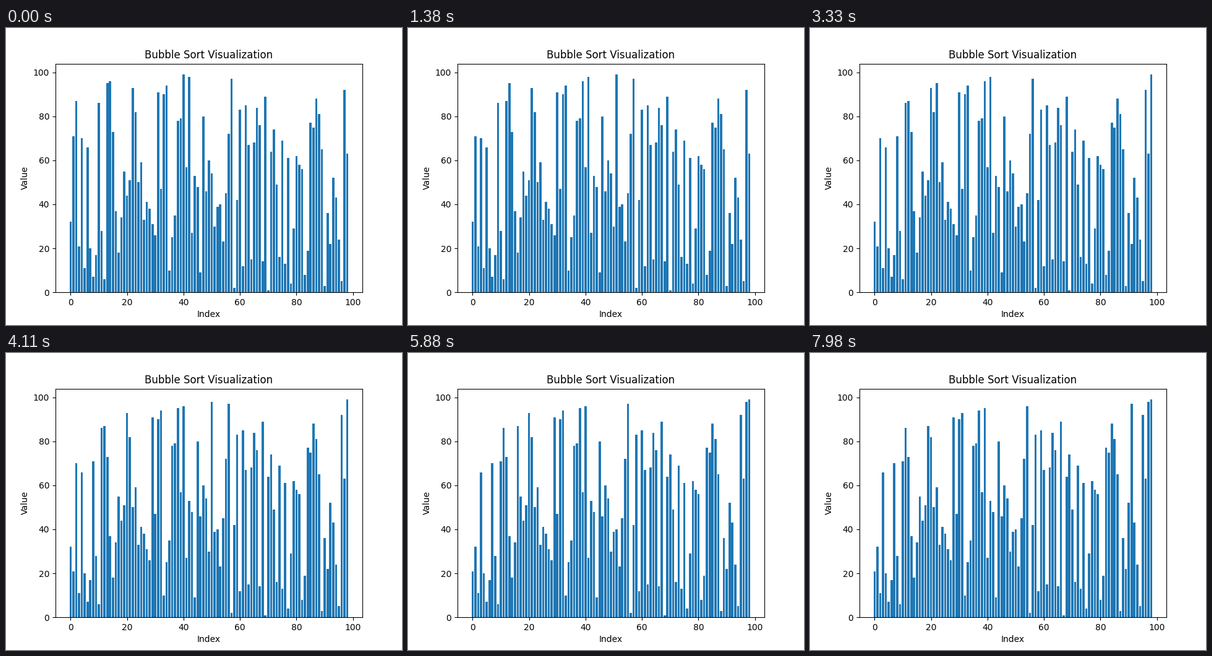
Write a matplotlib script that moves like this. It is 640x480 px and loops after 8000 ms.

```python
import matplotlib.pyplot as plt
from matplotlib.animation import FuncAnimation

LOOP_MS = 8000
INTERVAL = 20
SWAP_MS = 30

START = [
    32, 71, 87, 21, 70, 11, 66, 20, 7, 17,
    86, 28, 6, 95, 96, 73, 37, 18, 34, 55,
    44, 51, 93, 82, 50, 59, 33, 41, 38, 31,
    26, 91, 47, 90, 94, 10, 25, 35, 78, 79,
    99, 57, 98, 27, 53, 48, 9, 80, 46, 60,
    54, 30, 39, 40, 23, 45, 72, 97, 2, 42,
    83, 12, 85, 67, 15, 68, 84, 76, 14, 89,
    1, 64, 74, 49, 16, 69, 13, 61, 4, 29,
    62, 58, 56, 8, 19, 77, 75, 88, 81, 65,
    3, 36, 22, 52, 43, 24, 5, 92, 63,
]


def bubble_states(values, count):
    """Return the list after each of the first swaps of a bubble sort."""
    data = list(values)
    states = [data[:]]
    for end in range(len(data) - 1, 0, -1):
        for j in range(end):
            if data[j] > data[j + 1]:
                data[j], data[j + 1] = data[j + 1], data[j]
                states.append(data[:])
                if len(states) == count:
                    return states
    return states


states = bubble_states(START, LOOP_MS // SWAP_MS + 1)

fig, ax = plt.subplots(figsize=(6.4, 4.8), dpi=100)
bars = ax.bar(range(len(START)), START, color="#1f77b4")
ax.set_title("Bubble Sort Visualization")
ax.set_xlabel("Index")
ax.set_ylabel("Value")


def update(frame):
    # Round to the nearest tick so swaps line up with the 30 ms rhythm.
    step = (frame * INTERVAL + INTERVAL // 2) // SWAP_MS
    for bar, value in zip(bars, states[step]):
        bar.set_height(value)
    return bars


anim = FuncAnimation(fig, update, frames=LOOP_MS // INTERVAL,
                     interval=INTERVAL, repeat=True, repeat_delay=0)
plt.show()
```
